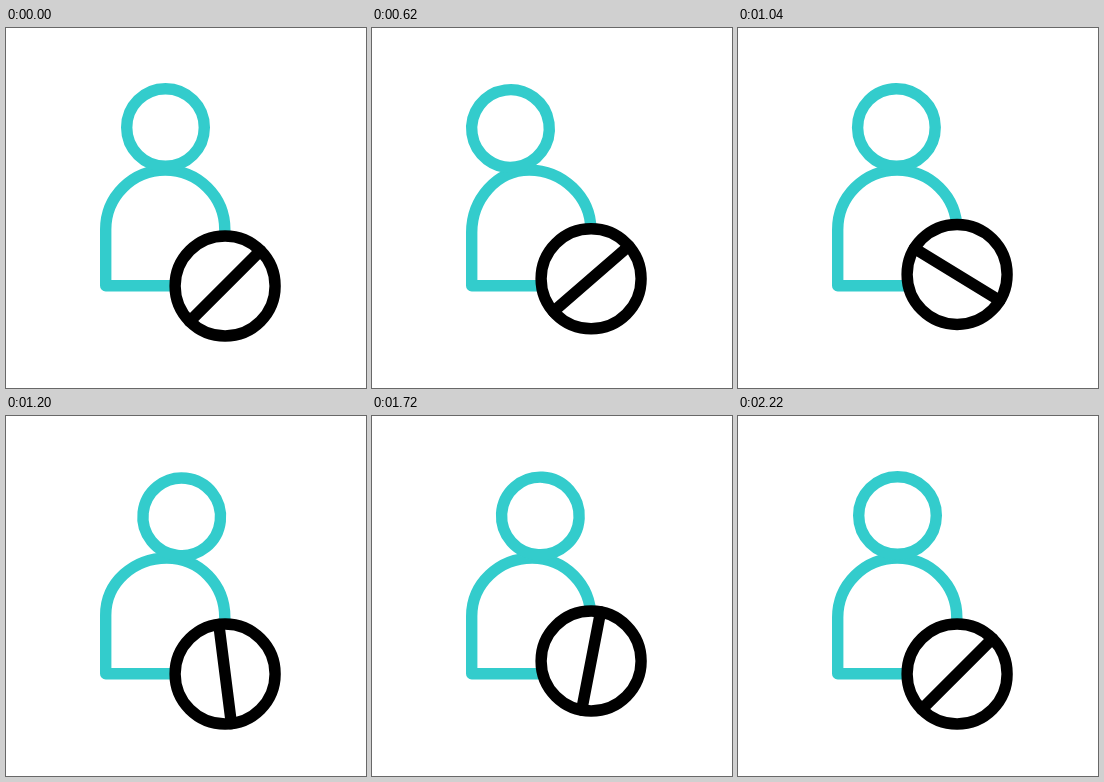
Write an HTML page that moves like this. It is 360x360 px and loops after 2.4 s.

```html
<!DOCTYPE html>
<html lang="en">
<head>
<meta charset="utf-8">
<title>Blocked user</title>
<style>
  html, body { margin: 0; width: 100%; height: 100%; overflow: hidden; background: #fff; }
  svg { display: block; width: 100%; height: 100%; }
</style>
</head>
<body>
<svg viewBox="0 0 360 360" fill="none" stroke-width="11.4" stroke-linecap="round" stroke-linejoin="round">
  <g stroke="#33cccc">
    <path id="body"/>
    <circle id="head" cx="159.5" cy="99.5" r="38.8"/>
  </g>
  <g id="badge" stroke="#000">
    <circle r="50" fill="#fff"/>
    <path id="slash" d="M-35.4 35.4L35.4 -35.4"/>
  </g>
</svg>
<script>
const LOOP = 2400;
const $ = id => document.getElementById(id);
const body = $('body'), head = $('head'), badge = $('badge'), slash = $('slash');

const progress = (t, from, to) => Math.min(1, Math.max(0, (t - from) / (to - from)));
const ease = u => u * u * (3 - 2 * u);
const bump = u => Math.sin(Math.PI * u) ** 2;

// The head leans left, swings to the right and comes back (-1 to 1).
const swing = t =>
  2 * ease(progress(t, 790, 1310)) - ease(progress(t, 200, 610)) - ease(progress(t, 1500, 1900));

// The badge makes a high hop and then a low one.
const hop = t => 27 * bump(progress(t, 500, 1200)) + 13 * bump(progress(t, 1200, 2220));

// One full turn: a half turn speeding up, then a half turn slowing down.
const spin = t =>
  180 * (progress(t, 495, 1333) ** 2 + 1 - (1 - progress(t, 1333, 2020)) ** 2);

function bodyPath(lean) {
  const left = 99.7, right = 218.8, bottom = 257.8, top = 142.1, shoulder = 201.5, k = 32.9;
  const x = 159.25 + lean * 2;
  const leftY = shoulder - lean * 3;
  return `M${left} ${bottom}V${leftY}C${left} ${leftY - k} ${x - k} ${top} ${x} ${top}` +
    `S${right} ${shoulder - k} ${right} ${shoulder}V${bottom}Z`;
}

function draw(t) {
  const lean = swing(t);
  head.setAttribute('transform', `rotate(${8.2 * lean} 156 246.5)`);
  body.setAttribute('d', bodyPath(lean));
  badge.setAttribute('transform', `translate(219.1 ${258 - hop(t)})`);
  slash.setAttribute('transform', `rotate(${spin(t)})`);
}

const start = performance.now();
function tick() {
  draw((performance.now() - start) % LOOP);
  requestAnimationFrame(tick);
}
tick();
</script>
</body>
</html>
```
